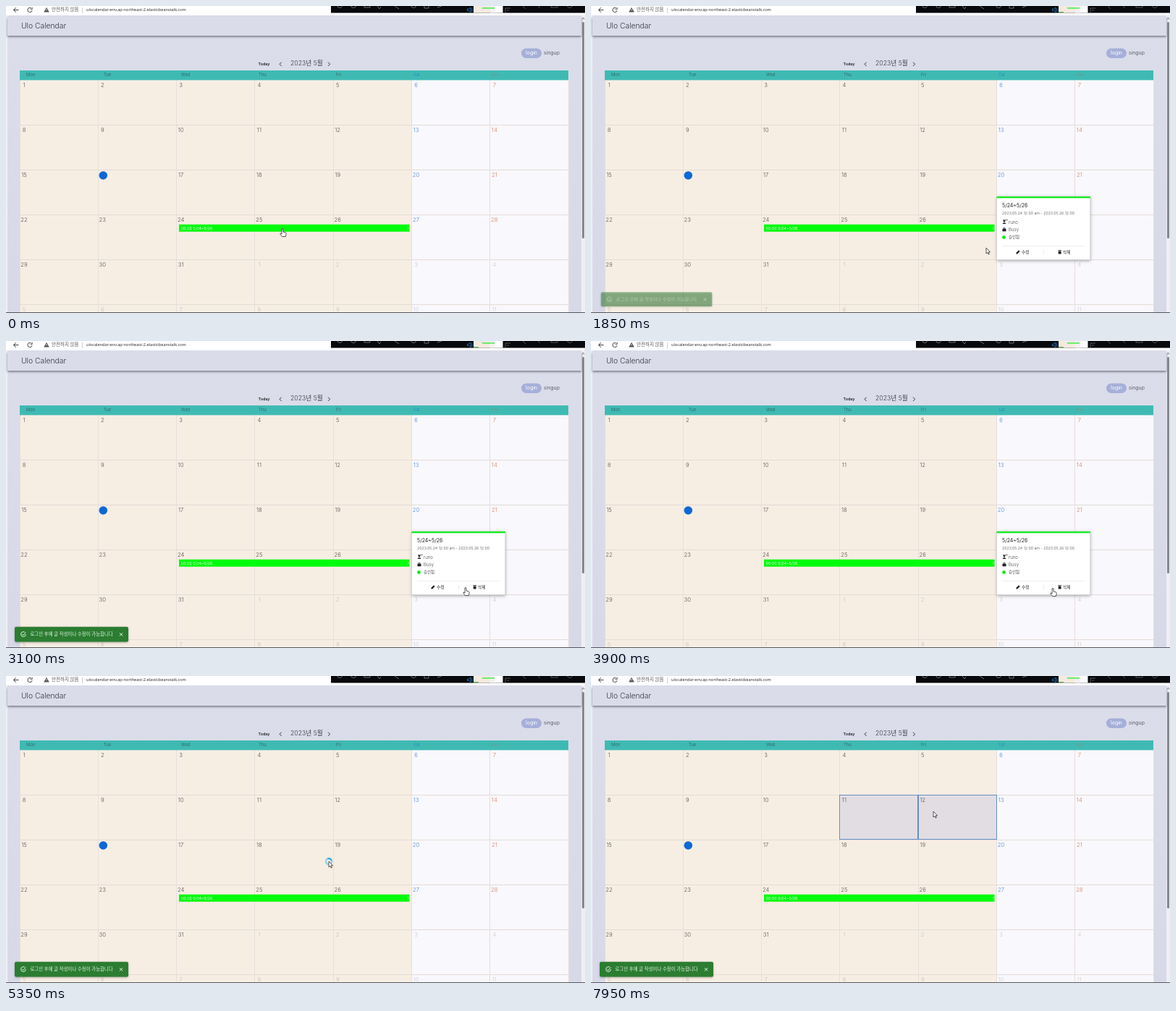
Recreate the animation shown at these times as an HTML page with a canvas. Size 800 by 424 pixels, loop 8 s.

```html
<!DOCTYPE html>
<html lang="ko">
<head>
<meta charset="utf-8">
<title>Calendar</title>
<style>
html, body { margin: 0; width: 100%; height: 100%; overflow: hidden; background: #fff; }
canvas { display: block; width: 100vw; height: 100vh; }
</style>
</head>
<body>
<canvas id="stage" width="800" height="424"></canvas>
<script>
const ctx = document.getElementById('stage').getContext('2d');
const LOOP = 8000, STEP = 50;
const UI = 'Inter, "Noto Sans CJK KR", "Noto Sans CJK", sans-serif';
const CHROME = '"Open Sans", "Noto Sans CJK KR", "Noto Sans CJK", sans-serif';
const LEFT = 19, RIGHT = 777, TOP = 102, CELL_W = 108.3, CELL_H = 62;
const INK = '#45434a';

// time, x, y of the pointer tip
const PATH = [
  [0, 382, 308], [250, 382, 308], [700, 546, 334], [1850, 546, 334],
  [2200, 597, 339], [2500, 597, 339], [3000, 635, 341], [3400, 635, 341],
  [3850, 638, 342], [4250, 640, 341], [4600, 640, 341], [5100, 446, 256],
  [5900, 446, 256], [6200, 435, 199], [6450, 435, 199], [6850, 473, 187]
];
// opening and closing time of each toast
const TOASTS = [[250, 1750], [2200, 3650], [4400, 5920], [6980, 8480]];
const POPUP = [250, 5200], BUSY = [5200, 5900], PICK = 6450;

const clamp = v => Math.max(0, Math.min(1, v));
const ease = v => { const p = clamp(v); return p * p * (3 - 2 * p); };
const within = (t, [a, b]) => t >= a && t < b;

function rect(x, y, w, h, color) {
  ctx.fillStyle = color;
  ctx.fillRect(x, y, w, h);
}

function round(x, y, w, h, r, color) {
  ctx.fillStyle = color;
  ctx.beginPath();
  ctx.roundRect(x, y, w, h, r);
  ctx.fill();
}

function dot(x, y, r, color) {
  ctx.fillStyle = color;
  ctx.beginPath();
  ctx.arc(x, y, r, 0, 7);
  ctx.fill();
}

function ring(x, y, r, color, width = 1, from = 0, to = Math.PI * 2) {
  ctx.strokeStyle = color;
  ctx.lineWidth = width;
  ctx.beginPath();
  ctx.arc(x, y, r, from, to);
  ctx.stroke();
}

function stroke(d, color, width = 1) {
  ctx.strokeStyle = color;
  ctx.lineWidth = width;
  ctx.stroke(new Path2D(d));
}

function fill(d, color) {
  ctx.fillStyle = color;
  ctx.fill(new Path2D(d));
}

function text(s, x, y, size, color, { weight = 300, family = UI, align = 'left' } = {}) {
  ctx.font = `${weight} ${size}px ${family}`;
  ctx.textAlign = align;
  ctx.textBaseline = 'middle';
  ctx.fillStyle = color;
  ctx.fillText(s, x, y);
}

function shadow(color, blur, dy) {
  ctx.shadowColor = color;
  ctx.shadowBlur = blur;
  ctx.shadowOffsetY = dy;
}

function pointerAt(t) {
  let i = 0;
  while (i < PATH.length - 1 && PATH[i + 1][0] <= t) i++;
  const a = PATH[i], b = PATH[i + 1] || a;
  const p = b === a ? 0 : ease((t - a[0]) / (b[0] - a[0]));
  return { x: a[1] + (b[1] - a[1]) * p, y: a[2] + (b[2] - a[2]) * p };
}

function drawBrowser(t) {
  rect(0, 0, 800, 13, '#fff');
  stroke('M10.5 5.5H17.5 M13.8 2.2L10.5 5.5L13.8 8.8', '#444');
  ring(33, 5.5, 3.1, '#444', 1, 0.2, 5.4);
  stroke('M36.2 1.8V4.4H33.6', '#444', 0.9);
  fill('M56 1.8L59.8 8.6H52.2Z', '#555');
  rect(55.6, 4, 0.8, 2.4, '#fff');
  text('안전하지 않음', 63, 5.5, 6.5, '#555', { weight: 400, family: CHROME });
  rect(105, 2, 0.7, 8, '#bbb');
  text('ulocalendar-env.ap-northeast-2.elasticbeanstalk.com', 111, 5.5, 5.6, '#222',
    { weight: 400, family: CHROME });

  rect(449, 0, 351, 9.5, '#08090d');
  for (const x of [461, 480, 563]) ring(x, -1, 3.5, '#888', 0.8, 0.2, 2.9);
  stroke('M495 0V2H503V0 M513 0L516 4L518 1 M537 0L543 4 M578 0V3H584V0 M596 2L602 0', '#888', 0.8);
  stroke('M690 9V3H697M692 6H695 M714 0L718 4 M735 0L738 3 M753 0V2H762V0 M775 0L779 3L783 0', '#777', 0.7);
  stroke('M637.5 4.2H639.5L642 2V8.5L639.5 6.5H637.5Z M643.5 3.5Q645 5.5 643.5 7.5', '#2588d8', 0.8);

  // small window preview
  rect(646, 0, 30, 9.5, '#f4eadf');
  rect(669, 0, 7, 9.5, '#f3f0f2');
  rect(658, 2.2, 17, 1.4, '#32ee3c');
  if (t >= 1050) rect(646, 8, 7, 1.3, '#57a45c');
  rect(676, 0, 10.5, 9.5, '#fff');
}

function drawPage() {
  const bg = ctx.createLinearGradient(0, 13, 0, 424);
  bg.addColorStop(0, '#dbddea');
  bg.addColorStop(1, '#d7d9e8');
  rect(0, 13, 800, 411, '#eeeef4');
  rect(2, 13, 793, 411, bg);
  ctx.save();
  shadow('rgba(50,50,75,.65)', 3, 1.5);
  rect(2, 14, 793, 27, '#dadce9');
  ctx.restore();
  text('Ulo Calendar', 21, 27.5, 10.3, '#36363f');
  round(796, 22, 3, 299, 1.5, '#85868c');
  stroke('M796 18.5L797.5 16L799 18.5', '#666', 0.8);

  round(712, 58.5, 28, 13.5, 6.8, '#a5afd9');
  text('login', 726, 65, 7, '#fff', { align: 'center', weight: 400 });
  text('singup', 743, 65, 7, '#3f3f4b');
  text('Today', 348.5, 80.3, 5.4, '#222', { weight: 600 });
  stroke('M380.6 77.7L378 80.3L380.6 82.9 M445 77.7L447.6 80.3L445 82.9', '#333', 1);
  text('2023년 5월', 393, 79.5, 8.7, '#3c3c45');
}

function cellBox(col, row) {
  return [LEFT + col * CELL_W, TOP + row * CELL_H, CELL_W, CELL_H];
}

function dayColor(col, dim) {
  if (dim) return col < 5 ? '#c6bfb9' : col === 5 ? '#c3c8d8' : '#d5c8c9';
  return col < 5 ? '#55504f' : col === 5 ? '#4885d5' : '#d37c63';
}

function drawCalendar(t, pointer) {
  const weekend = LEFT + 5 * CELL_W;
  rect(LEFT, TOP, weekend - LEFT, 322, '#f7eee3');
  rect(weekend, TOP, RIGHT - weekend, 322, '#f9f8fc');
  for (let i = 0; i <= 7; i++) rect(Math.floor(LEFT + i * CELL_W), TOP, 1, 322, '#e6dfdb');
  for (let r = 1; r < 6; r++) rect(LEFT, TOP + r * CELL_H, RIGHT - LEFT, 1, '#e3dcd8');

  rect(LEFT, 89, RIGHT - LEFT, 13.4, '#3fbab3');
  ['Mon', 'Tue', 'Wed', 'Thu', 'Fri', 'Sat', 'Sun'].forEach((day, i) => {
    text(day, 28 + i * 107, 95.7, 5.9, i < 5 ? '#2c5755' : i === 5 ? '#2b82bf' : '#7e8f80');
  });

  if (t >= PICK) {
    const last = pointer.x > 452 ? 4 : 3;
    for (let col = 3; col <= last; col++) {
      const [x, y, w, h] = cellBox(col, 1).map(Math.floor);
      rect(x, y, w, h, '#e2dde2');
      ctx.strokeStyle = '#6590c8';
      ctx.lineWidth = 1;
      ctx.strokeRect(x + 0.5, y + 0.5, w, h - 1);
    }
  }

  for (let i = 0; i < 42; i++) {
    const col = i % 7, row = Math.floor(i / 7), dim = i > 30;
    const x = 25 + col * CELL_W, y = 109.5 + row * CELL_H;
    if (i === 15) dot(134.3, 234, 5.8, '#0d68d6');
    else text(dim ? i - 30 : i + 1, x, y, 7.7, dayColor(col, dim), { align: 'center' });
  }

  rect(239, 301.7, 318.5, 10, '#00fb0b');
  text('00:00 5/24~5/26', 241.5, 307, 5.4, '#efffef', { weight: 400 });
  stroke('M555 305L556.5 306.8L555 308.6', '#a5ffa7', 0.7);
}

function drawPopup() {
  ctx.save();
  shadow('rgba(0,0,0,.35)', 4, 1);
  rect(560.5, 263, 129.5, 87.5, '#fff');
  ctx.restore();
  ctx.strokeStyle = '#cfcfd3';
  ctx.lineWidth = 0.7;
  ctx.strokeRect(560.5, 263.3, 129.2, 87);
  rect(560.5, 263, 129.5, 2.3, '#13ec20');

  text('5/24~5/26', 568, 275.5, 7, '#222', { weight: 400 });
  text('2023.05.24 12:00 am - 2023.05.26 12:00', 568, 286, 5.25, INK);
  dot(571, 297, 1.5, '#333');
  fill('M568.3 301Q571 297 573.7 301Z', '#333');
  rect(569, 295.2, 7, 0.8, '#555');
  text('runo', 577, 298.7, 6.1, INK);
  round(568.5, 307.5, 5, 3.8, 0.6, '#222');
  ring(571, 307.5, 1.3, '#222', 0.8, Math.PI, 0);
  text('Busy', 577, 309.2, 6.1, INK);
  dot(570.5, 319.5, 2.4, '#12e91f');
  text('승인됨', 577, 319.3, 5.5, INK);
  rect(568, 331, 114, 0.7, '#e6e6e8');
  rect(625, 337, 0.7, 6, '#e0e0e3');
  fill('M587.5 342.5V340.8L591 337.3L592.6 338.9L589.1 342.5Z', '#222');
  text('수정', 595, 340.3, 5.7, '#222', { weight: 400 });
  fill('M645.3 337.2H650V338H645.3Z M645.7 338.6H649.6V342.5H645.7Z', '#222');
  text('삭제', 652, 340.3, 5.7, '#222', { weight: 400 });
}

function toastState(t) {
  const hit = TOASTS.find(([a, b]) => t >= a && t < b + 195);
  if (!hit) return null;
  const [open, close] = hit;
  if (t < close) {
    return { alpha: ease((t - open) / 225), scale: 0.75 + 0.25 * ease((t - open) / 150) };
  }
  return { alpha: 1 - ease((t - close) / 195), scale: 1 - 0.25 * ease((t - close - 65) / 195) };
}

function drawToast(t) {
  const state = toastState(t);
  if (!state) return;
  ctx.save();
  ctx.globalAlpha = state.alpha;
  ctx.translate(90.5, 405);
  ctx.scale(state.scale, state.scale ** 2);
  ctx.translate(-90.5, -405);
  ctx.save();
  shadow('rgba(0,0,0,.3)', 3, 1);
  round(12, 394.7, 157, 20.8, 2, '#2b7d31');
  ctx.restore();
  ring(24, 405, 3.4, '#eaf5ea', 0.9, 0, 5.3);
  stroke('M22.2 404.8L23.8 406.5L27.4 402.3', '#eaf5ea', 0.9);
  text('로그인 후에 글 작성이나 수정이 가능합니다', 33.5, 405, 6.35, '#e9f4e9');
  stroke('M157 403.2L161.2 407.4M161.2 403.2L157 407.4', '#fff', 0.9);
  ctx.restore();
}

function drawPointer(t, { x, y }) {
  const popup = within(t, POPUP);
  const onEvent = x > 239 && x < 557 && y > 301 && y < 312;
  const onButton = popup && x > 568 && x < 683 && y > 332;
  if (within(t, BUSY)) {
    ring(x, y, 4, '#8ed3ee', 2.4);
    ring(x, y, 4, '#38a9dc', 2, t / 150, t / 150 + 1.8);
  }
  ctx.save();
  ctx.translate(x, y);
  ctx.lineJoin = 'round';
  const hand = 'M-1 0Q0 -1 1 0V4L4.5 5Q5.4 5.3 5.2 6.6L4.3 10.5H-.5L-3.2 7Q-3.4 5.7 -2.2 6L-1 7Z';
  const arrow = 'M0 0V8L1.9 6.3L3.1 9.1L4.4 8.5L3.2 5.8H5.6Z';
  const shape = onEvent || onButton ? hand : arrow;
  fill(shape, '#fff');
  stroke(shape, '#222', 0.75);
  ctx.restore();
}

function draw(t) {
  const pointer = pointerAt(t);
  drawPage();
  drawBrowser(t);
  drawCalendar(t, pointer);
  if (within(t, POPUP)) drawPopup();
  drawToast(t);
  rect(0, 423, 800, 1, '#55565e');
  drawPointer(t, pointer);
}

const start = performance.now();
function tick() {
  const t = (performance.now() - start) % LOOP;
  draw(Math.floor(t / STEP) * STEP);
  requestAnimationFrame(tick);
}
tick();
</script>
</body>
</html>
```
